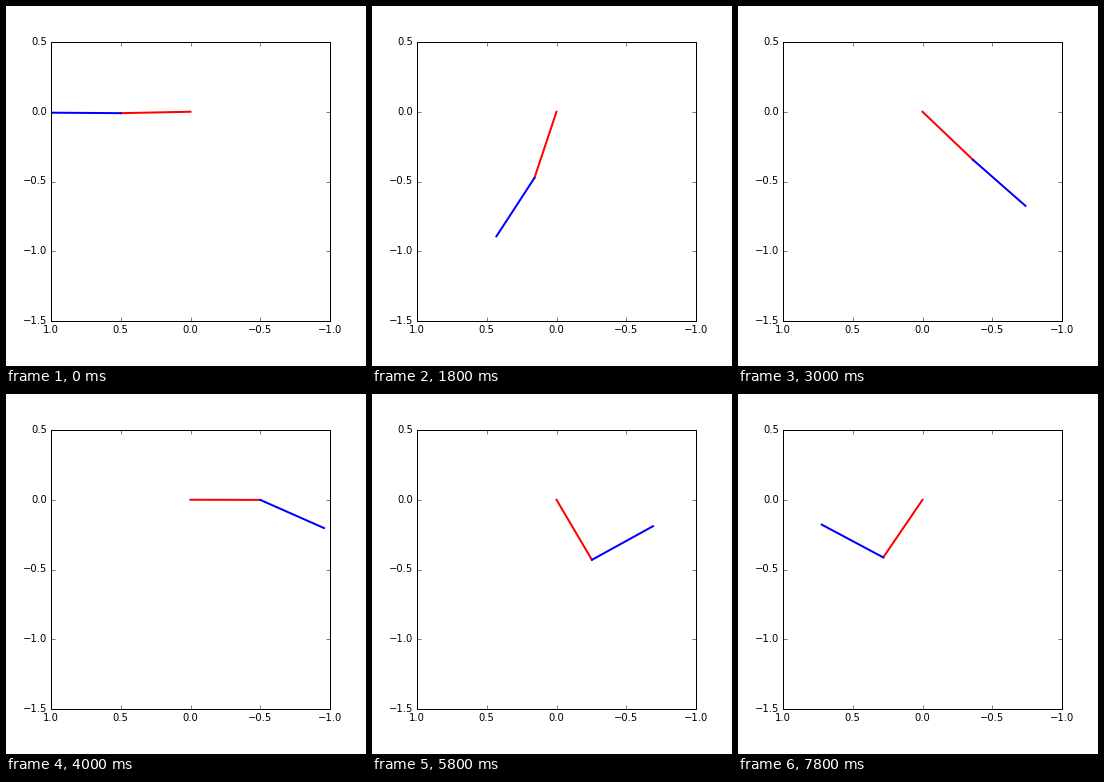
These frames come from a looping animation (360x360 px, 8000 ms). A matplotlib script:

```python
import numpy as np
import matplotlib.pyplot as plt
from matplotlib.animation import FuncAnimation

plt.style.use("classic")
plt.rcParams.update({
    "font.family": "DejaVu Sans",
    "font.size": 10,
    "savefig.dpi": "figure",
})

FRAMES = 40
INTERVAL = 200       # ms shown per frame
STEP = 0.04          # simulated seconds per frame
SUBSTEPS = 40
G = 9.81
L = 0.5              # length of each uniform rod


def derivs(s):
    """Two hinged uniform rods, angles measured from straight down."""
    a1, a2, w1, w2 = s
    c, d = np.cos(a1 - a2), np.sin(a1 - a2)
    mass = np.array([[4 / 3, c / 2], [c / 2, 1 / 3]])
    force = np.array([
        -1.5 * G / L * np.sin(a1) - 0.5 * d * w2 ** 2,
        -0.5 * G / L * np.sin(a2) + 0.5 * d * w1 ** 2,
    ])
    return np.concatenate([[w1, w2], np.linalg.solve(mass, force)])


def rk4(s, h):
    k1 = derivs(s)
    k2 = derivs(s + h / 2 * k1)
    k3 = derivs(s + h / 2 * k2)
    k4 = derivs(s + h * k3)
    return s + h / 6 * (k1 + 2 * k2 + 2 * k3 + k4)


def simulate():
    state = np.array([np.pi / 2, np.pi / 2, 0.0, 0.0])
    poses = []
    for _ in range(FRAMES):
        for _ in range(SUBSTEPS):
            state = rk4(state, STEP / SUBSTEPS)
        poses.append(state[:2])
    return poses


poses = simulate()

fig = plt.figure(figsize=(5, 5), dpi=72, facecolor="white")
ax = fig.add_axes([0.125, 0.125, 0.775, 0.775])
ax.set_xlim(1, -1)
ax.set_ylim(-1.5, 0.5)
ax.set_xticks(np.arange(1, -1.1, -0.5))
ax.set_yticks(np.arange(-1.5, 0.6, 0.5))
upper, = ax.plot([], [], "r-", lw=2)
lower, = ax.plot([], [], "b-", lw=2)


def draw(i):
    a1, a2 = poses[i]
    x1, y1 = L * np.sin(a1), -L * np.cos(a1)
    x2, y2 = x1 + L * np.sin(a2), y1 - L * np.cos(a2)
    upper.set_data([0, x1], [0, y1])
    lower.set_data([x1, x2], [y1, y2])
    return upper, lower


anim = FuncAnimation(fig, draw, frames=FRAMES, interval=INTERVAL, repeat=True)
plt.show()
```
